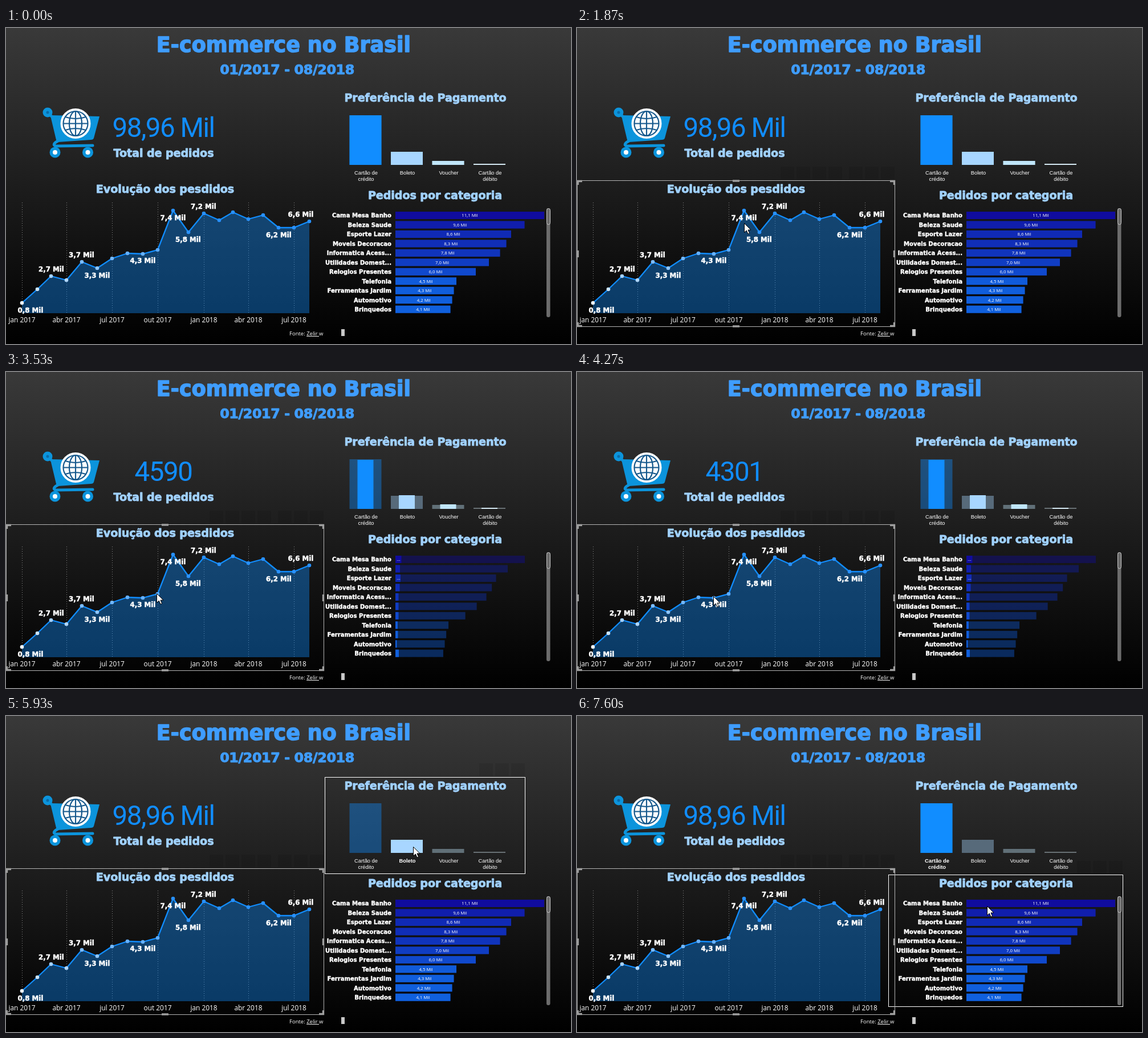
Recreate the animation shown at these times as an HTML page. Size 991 by 554 pixels, loop 8 s.

```html
<!DOCTYPE html>
<html lang="pt-BR">
<head>
<meta charset="utf-8">
<title>E-commerce no Brasil</title>
<style>
html, body { margin: 0; width: 100%; height: 100%; overflow: hidden; background: #000; }
svg { display: block; width: 100%; height: 100%; }
text { fill: #fff; text-anchor: middle; white-space: pre; }
.black { font-family: "DejaVu Sans", sans-serif; font-weight: 700; stroke-width: .042em; stroke-linejoin: round; }
.title { font-size: 36.4px; letter-spacing: .1px; fill: #3f9dff; stroke: #3f9dff; }
.sub { font-size: 23.8px; letter-spacing: -.4px; fill: #3f9dff; stroke: #3f9dff; }
.head { font-size: 19.2px; letter-spacing: -.13px; fill: #a0d1ff; stroke: #a0d1ff; }
.val { font-size: 11.8px; stroke: #fff; }
.cat { font-size: 10.1px; stroke: #fff; text-anchor: end; }
.axis { font: 500 11.9px "Open Sans", sans-serif; }
.pay { font: 9.33px "Liberation Sans", Arial, sans-serif; }
.bar { font: 500 7.9px "Open Sans", sans-serif; }
.foot { font: 500 9.5px "Open Sans", sans-serif; text-anchor: start; }
.total { font: 400 47.5px Roboto, sans-serif; letter-spacing: -1.5px; fill: #118dff; }
</style>
</head>
<body>
<svg id="stage" viewBox="0 0 991 554" preserveAspectRatio="none">
  <defs>
    <linearGradient id="bg" x2="0" y2="1">
      <stop stop-color="#393939"/><stop offset="1" stop-color="#000"/>
    </linearGradient>
  </defs>
  <rect width="991" height="554" fill="url(#bg)"/>
</svg>
<script>
const stage = document.getElementById('stage');
const LOOP = 8000, STEP = 200 / 3, BLUE = '#118dff';

function el(tag, attrs, parent = stage) {
  const node = document.createElementNS('http://www.w3.org/2000/svg', tag);
  for (const k in attrs) node.setAttribute(k, attrs[k]);
  return parent.appendChild(node);
}
function text(str, x, y, cls, parent) {
  const node = el('text', { x, y, class: cls }, parent);
  node.textContent = str;
  return node;
}
const rect = (x, y, width, height, fill, parent) => el('rect', { x, y, width, height, fill }, parent);
const path = (d, attrs, parent) => el('path', { d, fill: 'none', ...attrs }, parent);
const circle = (cx, cy, r, fill, parent) => el('circle', { cx, cy, r, fill }, parent);
const lerp = (a, b, p) => a + (b - a) * p;
const mix = (a, b, p) => `rgb(${a.map((v, i) => Math.round(lerp(v, b[i], p)))})`;
const show = (node, on) => node.setAttribute('visibility', on ? 'visible' : 'hidden');
function ease(t, from, to) {
  const p = Math.min(1, Math.max(0, (t - from) / (to - from)));
  return p * p * (3 - 2 * p);
}

// Headings
text('E-commerce no Brasil', 487, 42, 'black title');
text('01/2017 - 08/2018', 493, 81, 'black sub');
text('Preferência de Pagamento', 735.5, 129, 'black head');
text('Total de pedidos', 276.5, 226, 'black head');
text('Evolução dos pesdidos', 279, 289, 'black head');
text('Pedidos por categoria', 752.5, 300, 'black head');
const total = text('', 276, 191, 'total');

// Cart with globe
function drawCart() {
  const cyan = '#0c94dc', navy = '#15588c';
  path('M73 148L81 156L91 198Q80 204 87 207L152 206',
    { stroke: cyan, 'stroke-width': 5, 'stroke-linejoin': 'round', 'stroke-linecap': 'round' });
  path('M80 153L164 155L154 193Q153 196 149 196L91 200Z', { fill: cyan });
  circle(73, 148, 8.5, cyan);
  circle(73, 148, 2.5, '#0a6ba8');
  for (const x of [86, 143.5]) {
    circle(x, 218, 9.5, cyan);
    circle(x, 218, 4, '#fff');
  }
  circle(122, 167.5, 26.5, '#fff');
  const line = { stroke: navy, 'stroke-width': 2.2 };
  for (const rx of [21.5, 11]) el('ellipse', { cx: 122, cy: 167.5, rx, ry: 21.5, fill: 'none', ...line });
  path('M122 146V189M100.5 167.5H143.5M104 156Q122 162 140 156M104 179Q122 173 140 179', line);
}
drawCart();

// Orders over time
const xs = [28, 55, 79, 106, 133, 160, 186, 213, 240, 266, 293, 320, 347, 374, 398, 425, 451, 478, 505, 532];
const ys = [482, 458, 435, 442, 410, 421, 404, 395, 396, 389, 320, 358, 325, 337, 323, 335, 328, 350, 350, 339];
const months = ['jan 2017', 'abr 2017', 'jul 2017', 'out 2017', 'jan 2018', 'abr 2018', 'jul 2018'];
months.forEach((m, i) => {
  const x = xs[i * 3];
  path(`M${x + .5} 306V500`, { stroke: '#8a8a8a', 'stroke-dasharray': '1 3' });
  text(m, x, 516, 'axis');
});
const trend = 'M' + xs.map((x, i) => `${x} ${ys[i]}`).join('L');
path(trend + 'V500H28Z', { fill: BLUE, 'fill-opacity': .39 });
path(trend, { stroke: BLUE, 'stroke-width': 2.3, 'stroke-linejoin': 'round' });
xs.forEach((x, i) => circle(x, ys[i], 3.3, mix([240, 248, 255], [40, 145, 255], Math.min(1, (482 - ys[i]) / 125))));
[['0,8', 43, 499], ['2,7', 79.5, 427], ['3,7', 132.5, 402], ['3,3', 160, 438], ['4,3', 240, 412],
 ['7,4', 293, 337], ['5,8', 319.5, 375], ['7,2', 346.5, 317], ['6,2', 478.5, 367], ['6,6', 517, 331]]
  .forEach(([v, x, y]) => text(v + ' Mil', x, y, 'black val'));

// Payment methods
const pays = [
  { x: 602.5, top: 153, hi: 154, fill: BLUE, name: ['Cartão de', 'crédito'] },
  { x: 675, top: 217, hi: 216, fill: '#a8d6ff', name: ['Boleto'] },
  { x: 747.5, top: 233, hi: 232, fill: '#c0e6fa', name: ['Voucher'] },
  { x: 820, top: 238, hi: 238, fill: '#d4e8f2', name: ['Cartão de', 'débito'] }
];
pays.forEach(p => {
  rect(p.x, p.top, 56, 240 - p.top, p.fill).setAttribute('opacity', .4);
  p.bar = rect(p.x, p.top, 56, 240 - p.top, p.fill);
  p.label = el('g', {});
  p.name.forEach((s, i) => text(s, p.x + 29, 257 + i * 11, 'pay', p.label));
});

// Categories: name, thousands of orders, bar width, highlighted width
const cats = [
  ['Cama Mesa Banho', 11.1, 261, 10.5], ['Beleza Saude', 9.6, 226.5, 8], ['Esporte Lazer', 8.6, 203, 9],
  ['Moveis Decoracao', 8.3, 194.5, 7.5], ['Informatica Acess...', 7.8, 183.5, 5.5], ['Utilidades Domest...', 7, 164, 5.5],
  ['Relogios Presentes', 6, 141, 5.5], ['Telefonia', 4.5, 107, 4], ['Ferramentas Jardim', 4.3, 102.5, 4.5],
  ['Automotivo', 4.2, 99.5, 2.5], ['Brinquedos', 4.1, 96.5, 6]
].map(([name, v, w, hi], i) => {
  const y = 322 + i * 16.47;
  const fill = mix([16, 96, 222], [16, 12, 158], (v - 4.1) / 7);
  text(name, 676, y + 10.3, 'black cat');
  const dim = rect(683, y, w, 13, fill);
  dim.setAttribute('opacity', .4);
  const bar = rect(683, y, w, 13, fill);
  const label = text(v.toFixed(1).replace('.', ',') + ' Mil', 683 + w / 2, y + 9.4, 'bar');
  const dots = i === 0 || i === 2 ? text('...', 688.5, y + 9.4, 'bar') : null;
  return { w, hi, dim, bar, label, dots };
});
el('rect', { x: 948, y: 316, width: 6.5, height: 191, rx: 3, fill: '#6c6c6c' });
el('rect', { x: 948.5, y: 316.5, width: 6, height: 28, rx: 3, fill: '#686868', stroke: '#c8c8c8' });

// Footer
const foot = text('Fonte: ', 497, 539, 'foot');
el('tspan', { 'text-decoration': 'underline' }, foot).textContent = 'Zelir ';
el('tspan', {}, foot).textContent = 'w';
rect(588, 528, 6, 12, '#c8c8c8');

// Hover frames
function panel(x, y, r, b, icons, iconY) {
  const frame = el('rect', { x: x + .5, y: y + .5, width: r - x - 1, height: b - y - 1, fill: 'none', stroke: '#fff' });
  const menu = el('g', { opacity: .07 });
  icons.forEach(ix => rect(ix, iconY, 24, 22, '#000', menu));
  return { frame, menu, has: (px, py) => px >= x && px < r && py >= y && py < b };
}
const chartBox = panel(0, 267, 558, 524, [357, 385, 413, 441, 477, 505, 533], 243);
const payBox = panel(559, 107, 911, 277, [830, 858, 886], 83);
const catBox = panel(546, 278, 958, 510, [877, 905, 933], 254);

// Selection frame with handles
const picked = el('g', {});
path('M.5 267.5H557.5V523.5H.5Z', { stroke: '#b4b4b4' }, picked);
path('M1.5 275V268.5H9M549 268.5H556.5V275M1.5 516V522.5H9M549 522.5H556.5V516M273 268H285M273 523H285M1.5 390V402M556.5 390V402',
  { stroke: '#a0a0a0', 'stroke-width': 3.4 }, picked);

const cursor = path('M.5 .5V16.5L4.3 13L7 19L9.6 17.9L7 12H12Z', { fill: '#fff', stroke: '#000' });

// Pointer route: time, x, y
const route = [
  [200, 976, 536], [1000, 293, 341], [1260, 293, 341], [1266, 293, 342], [1866, 293, 342],
  [2133, 278, 150], [2466, 264, 388], [3800, 264, 388], [4133, 239, 393], [4666, 239, 393],
  [5000, 697, 227], [5800, 697, 227], [5933, 714, 229], [6200, 636, 230], [7200, 636, 230], [7600, 719, 333]
];
function pointer(t) {
  let i = 0;
  while (i < route.length - 2 && t >= route[i + 1][0]) i++;
  const [a, b] = [route[i], route[i + 1]];
  const p = ease(t, a[0], b[0]);
  return [lerp(a[1], b[1], p), lerp(a[2], b[2], p)];
}

function render(t) {
  const [cx, cy] = pointer(t);
  const here = t >= 199;
  const selected = t >= 1860;
  cursor.setAttribute('transform', `translate(${cx} ${cy})`);
  show(cursor, here);
  show(picked, selected);
  for (const box of [chartBox, payBox, catBox]) {
    const over = here && box.has(cx, cy);
    show(box.frame, over && !(box === chartBox && selected));
    show(box.menu, over || (box === chartBox && selected));
  }

  total.textContent = t < 2930 || t >= 5460 ? '98,96 Mil' : t < 4190 ? '4590' : '4301';

  const p = ease(t, 3067, 3533) - ease(t, 5467, 5660);
  const only = t < 5395 ? -1 : t < 6860 ? 1 : 0;
  pays.forEach((pay, i) => {
    const w = lerp(56, 28, p), top = lerp(pay.top, pay.hi, p);
    pay.bar.setAttribute('x', pay.x + (56 - w) / 2);
    pay.bar.setAttribute('width', w);
    pay.bar.setAttribute('y', top);
    pay.bar.setAttribute('height', 240 - top);
    show(pay.bar, only < 0 || only === i);
    for (const line of pay.label.children) line.style.fontWeight = only === i ? 700 : 400;
  });

  const full = t < 2930 || t >= 5660;
  cats.forEach(c => {
    c.dim.setAttribute('width', c.w * (1 - .13 * p));
    c.bar.setAttribute('width', lerp(c.w, c.hi, p));
    show(c.label, full);
    if (c.dots) show(c.dots, !full);
  });
}

function tick() {
  const t = performance.now() % LOOP;
  render(Math.floor((t + 4) / STEP) * STEP);
  requestAnimationFrame(tick);
}
tick();
</script>
</body>
</html>
```
